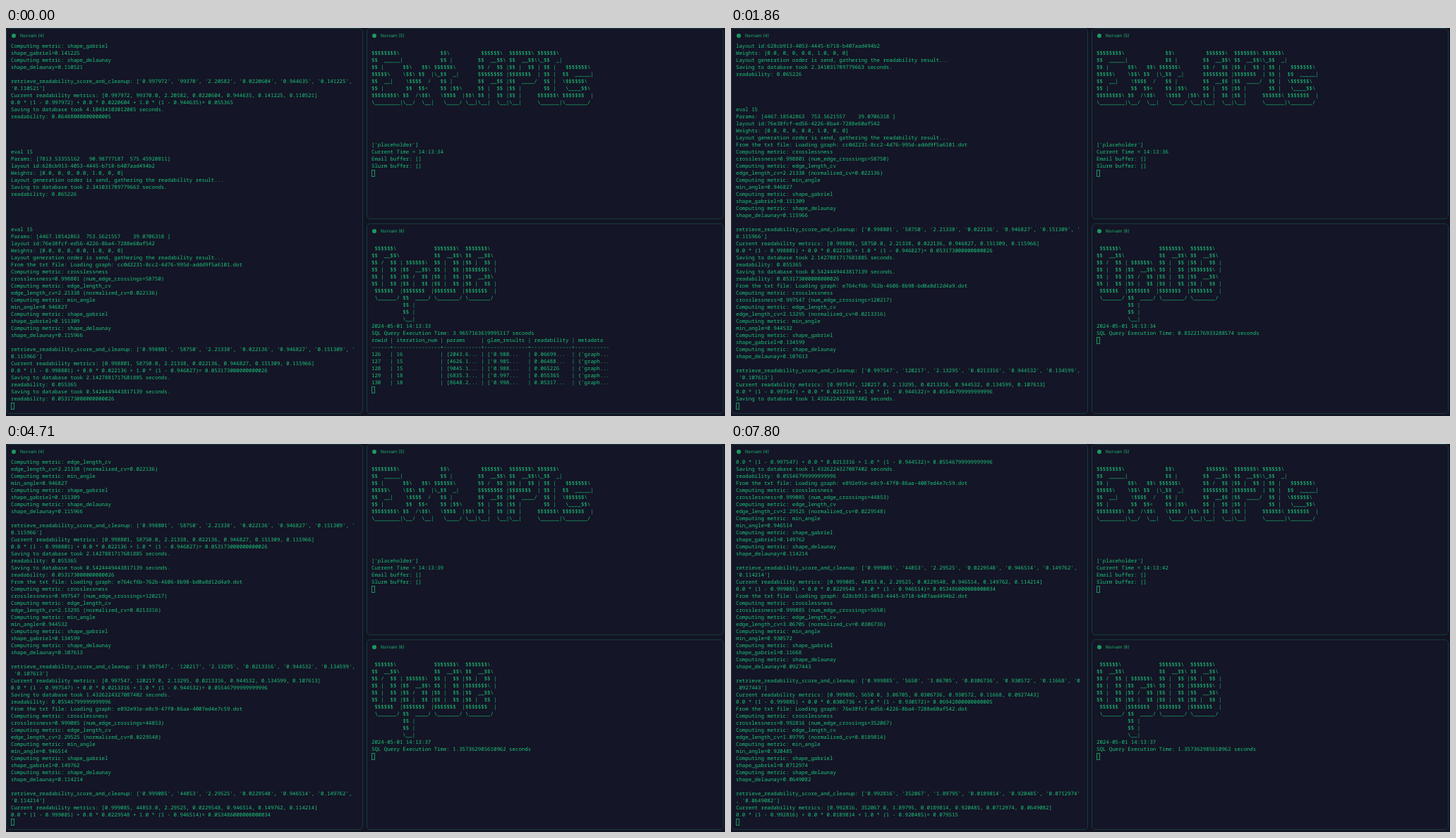
An HTML page that plays this animation: 1019x550 px, repeating every 8 s.

```html
<!DOCTYPE html>
<html lang="en">
<head>
<meta charset="utf-8">
<title>Terminal panes</title>
<style>
  html, body { margin: 0; width: 100%; height: 100%; overflow: hidden; background: #121422; }
  #stage { position: relative; width: 1019px; height: 550px; overflow: hidden; color: #1cc47a; }
  .pane { position: absolute; box-sizing: border-box; width: 506px; background: #141526;
          border: 1px solid #143c42; border-radius: 5px; }
  .dot { position: absolute; width: 6px; height: 6px; border-radius: 50%; background: #1d9a60; }
  .title { position: absolute; font: 6.3px/10px Inter, Roboto, sans-serif; white-space: pre;
           color: #1fb573; text-rendering: geometricPrecision; }
  pre { position: absolute; margin: 0; font: 500 7.4px/10px "Noto Sans Mono", "DejaVu Sans Mono", monospace;
        font-variant-ligatures: none; text-rendering: geometricPrecision; }
  .cursor { position: absolute; box-sizing: border-box; width: 5px; height: 10px; border: 1px solid #1a9660; }
</style>
</head>
<body>
<div id="stage"></div>
<script>
const LOOP = 8000, ROW = 10, COLS = 110, ROWS = 52;
const stage = document.getElementById('stage');

function add(tag, cls, x, y, text = '') {
  const el = document.createElement(tag);
  el.className = cls;
  el.style.left = x + 'px';
  el.style.top = y + 'px';
  el.textContent = text;
  stage.append(el);
  return el;
}

// A pane with its title bar; returns a function that shows lines and the cursor row.
function pane(x, y, height, title, firstRow) {
  add('div', 'pane', x, y).style.height = height + 'px';
  add('div', 'dot', x + 8, y + 7.5);
  add('div', 'title', x + 20, y + 5.5, title);
  const pre = add('pre', '', x + 7, firstRow);
  const cursor = add('div', 'cursor', x + 7, firstRow);
  return (lines, cursorRow = lines.length) => {
    const text = lines.join('\n');
    if (pre.textContent !== text) pre.textContent = text;
    cursor.style.top = firstRow + cursorRow * ROW + 'px';
  };
}

const showLog = pane(0, 0, 547, 'Norvam (4)', 21);
const showApi = pane(511, 0, 271, 'Norvam (5)', 21);
const showDb = pane(511, 277, 270, 'Norvam (6)', 298);

// ---- left pane: evaluation log
const wrap = s => s.length > COLS ? [s.slice(0, COLS), s.slice(COLS)] : [s];
const saved = (sec, score) => [`Saving to database took ${sec} seconds.`, `readability: ${score}`];
const gap = ['', '', '', ''];

function metrics(id, values) {
  const [cross, edges, len, cv, angle, gabriel, delaunay] = values.split(' ');
  const metric = (name, value) => [`Computing metric: ${name}`, `${name}=${value}`];
  return [
    `From the txt file: Loading graph: ${id}.dot`,
    ...metric('crosslessness', `${cross} (num_edge_crossings=${edges})`),
    ...metric('edge_length_cv', `${len} (normalized_cv=${cv})`),
    ...metric('min_angle', angle),
    ...metric('shape_gabriel', gabriel),
    ...metric('shape_delaunay', delaunay),
    '',
    ...wrap(`retrieve_readability_score_and_cleanup: ['${values.replaceAll(' ', "', '")}']`),
    `Current readability metrics: [${[cross, edges + '.0', len, cv, angle, gabriel, delaunay].join(', ')}]`,
    `0.0 * (1 - ${cross}) + 0.0 * ${cv} + 1.0 * (1 - ${angle})= ${1 - angle}`
  ];
}

const launch = (params, id) => [
  'eval 15', `Params: [${params}]`, `layout id:${id}`, 'Weights: [0.0, 0, 0, 0.0, 1.0, 0, 0]',
  'Layout generation order is send, gathering the readability result...'
];

const idA = '628cb913-4053-4445-b718-b407aad494b2';
const idB = '76e38fcf-ed56-4226-8ba4-7288e60af542';
const log = [
  ...metrics('', '0.997972 99370 2.20582 0.0220604 0.944635 0.141225 0.110521').slice(7),
  ...saved('4.10434103012085', '0.06488000000000005'),
  ...gap,
  ...launch('7813.53355162   90.98777187  575.45920811', idA),
  ...saved('2.341031789779663', '0.065226'),
  ...gap,
  ...launch('4467.18542863  753.5621557    39.0706318 ', idB),
  ...metrics('cc0d2231-8cc2-4d76-995d-addd9f5a6101', '0.998801 58750 2.21338 0.022136 0.946827 0.151309 0.115966'),
  ...saved('2.1427881717681885', '0.055365'),
  ...saved('0.5424449443817139', '0.053173000000000026'),
  ...metrics('e764cf6b-762b-4606-8b98-bd0a8d12d4a9', '0.997547 120217 2.13295 0.0213316 0.944532 0.134599 0.107613'),
  ...saved('1.4326224327087402', '0.05546799999999996'),
  ...metrics('e892e91e-e8c9-47f0-86aa-4007ed4e7c59', '0.999085 44853 2.29525 0.0229548 0.946514 0.149762 0.114214'),
  ...metrics(idA, '0.999885 5650 3.06705 0.0306736 0.930572 0.11668 0.0927443'),
  ...metrics(idB, '0.992816 352067 1.89795 0.0189814 0.920485 0.0712974 0.0649082')
];

// ---- right panes: banners, clock and table
const apiArt = String.raw`
$$$$$$$$\             $$\          $$$$$$\  $$$$$$$\ $$$$$$\
$$  _____|            $$ |        $$  __$$\ $$  __$$\\_$$  _|
$$ |      $$\   $$\ $$$$$$\       $$ /  $$ |$$ |  $$ | $$ |   $$$$$$$\
$$$$$\    \$$\ $$  |\_$$  _|      $$$$$$$$ |$$$$$$$  | $$ |  $$  _____|
$$  __|    \$$$$  /   $$ |        $$  __$$ |$$  ____/  $$ |  \$$$$$$\
$$ |       $$  $$<    $$ |$$\     $$ |  $$ |$$ |       $$ |   \____$$\
$$$$$$$$\ $$  /\$$\   \$$$$  |$$\ $$ |  $$ |$$ |     $$$$$$\ $$$$$$$  |
\________|\__/  \__|   \____/ \__|\__|  \__|\__|     \______|\_______/`.split('\n');

const dbArt = String.raw`
 $$$$$$\            $$$$$$$\  $$$$$$$\
$$  __$$\           $$  __$$\ $$  __$$\
$$ /  $$ | $$$$$$\  $$ |  $$ |$$ |  $$ |
$$ |  $$ |$$  __$$\ $$ |  $$ |$$$$$$$\ |
$$ |  $$ |$$ /  $$ |$$ |  $$ |$$  __$$\
$$ |  $$ |$$ |  $$ |$$ |  $$ |$$ |  $$ |
 $$$$$$  |$$$$$$$  |$$$$$$$  |$$$$$$$  |
 \______/ $$  ____/ \_______/ \_______/
          $$ |
          $$ |
          \__|`.split('\n');

const widths = [5, 13, 10, 12, 11, 10];
const cells = list => list.map((c, i) => c.padEnd(widths[i])).join(' | ');
const results = [
  "126 16 [2043.6... ['0.980... 0.06699...",
  "127 15 [4626.1... ['0.985... 0.06488...",
  "128 15 [9045.1... ['0.988... 0.065226",
  "129 18 [6835.3... ['0.997... 0.055365",
  "130 18 [8648.2... ['0.998... 0.05317...",
  "131 14 [7426.7... ['0.997... 0.05546..."
].map(r => cells([...r.split(' '), "{'graph..."]));

const table = from => [
  cells(['rowid', 'iteration_num', 'params', 'glam_results', 'readability', 'metadata']),
  widths.map(w => '-'.repeat(w)).join('-+-'),
  ...results.slice(from, from + 5)
];
const query = (sec, took) =>
  [...dbArt, `2024-05-01 14:13:${sec}`, `SQL Query Execution Time: ${took} seconds`];

const q1 = query(33, '3.9657163619995117');
const q2 = query(34, '0.8322176933288574');
const q3 = query(37, '1.357362985610962');

// Each step changes part of the state: log line count, clock second, cursor row, database lines.
const steps = [
  [0, { lines: 51, sec: 34, cur: 18, db: [...q1, ...table(0)] }],
  [420, { db: [] }],
  [470, { db: q2 }],
  [560, { lines: 67 }],
  [650, { sec: 35, cur: 16 }],
  [700, { cur: 18 }],
  [1670, { sec: 36, cur: 16 }],
  [1720, { cur: 18 }],
  [1800, { lines: 68 }],
  [1890, { lines: 69 }],
  [1920, { db: [...q2, ...table(1)] }],
  [2280, { lines: 85 }],
  [2710, { sec: 37 }],
  [2880, { db: [] }],
  [2920, { db: q3 }],
  [3720, { sec: 38 }],
  [4710, { sec: 39 }],
  [4950, { lines: 101 }],
  [5660, { lines: 117 }],
  [5730, { sec: 40, cur: 16 }],
  [5790, { cur: 18 }],
  [6780, { sec: 41 }],
  [7760, { sec: 42, cur: 16 }],
  [7800, { cur: 18 }]
];

let shown = -1;
function draw(t) {
  const count = steps.filter(s => s[0] <= t).length;
  if (count === shown) return;
  shown = count;
  const s = Object.assign({}, ...steps.slice(0, count).map(step => step[1]));
  showLog(log.slice(s.lines - ROWS + 1, s.lines));
  showApi([...apiArt, '', '', '', '', '', "['placeholder']", `Current Time = 14:13:${s.sec}`,
    'Email buffer: []', 'Slurm buffer: []'], s.cur);
  showDb(s.db);
}

const start = performance.now();
function tick() {
  draw((performance.now() - start) % LOOP);
  requestAnimationFrame(tick);
}
tick();
</script>
</body>
</html>
```
